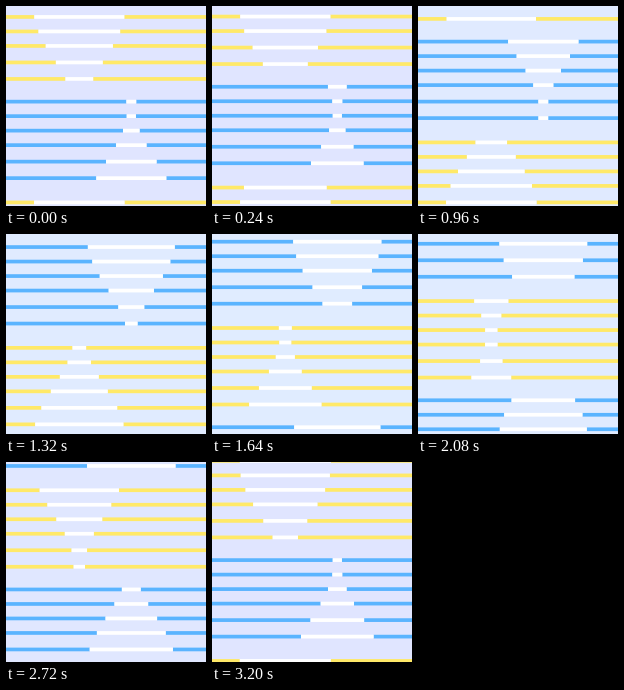
These frames come from a looping animation (200 by 200 pixels, 3240 ms). An HTML page with a canvas:

```html
<!DOCTYPE html>
<html>
<head>
<meta charset="utf-8">
<style>
html, body { margin: 0; width: 100%; height: 100%; overflow: hidden; }
canvas { display: block; width: 100vw; height: 100vh; }
</style>
</head>
<body>
<canvas id="stage" width="200" height="200"></canvas>
<script>
const ctx = document.getElementById('stage').getContext('2d');
const LOOP = 3240, SIZE = 200, THICK = 3.7, TAU = Math.PI * 2;
const ROWS = [0, 14.5, 29, 43.5, 60, 76.5];
const BANDS = [
  { start: 0, color: '#5ab4ff', mid: 125.3, width: 48.5, crest: 4 },
  { start: 100.8, color: '#ffe968', mid: 73.3, width: 51.3, crest: 2.9 }
];
const SWING = 40;

function drawLine(band, y) {
  const w = band.width + SWING * Math.cos(TAU * (y - band.crest) / SIZE);
  const left = band.mid - w / 2, right = band.mid + w / 2, top = y - THICK / 2;
  ctx.fillStyle = band.color;
  ctx.fillRect(0, top, left, THICK);
  ctx.fillRect(right, top, SIZE - right, THICK);
  ctx.fillStyle = '#fff';
  ctx.fillRect(left, top, w, THICK);
}

function draw(now) {
  const p = (now % LOOP) / LOOP;
  const wave = Math.cos(TAU * p);
  ctx.fillStyle = `rgb(224, ${Math.round(232.5 - 3.5 * wave)}, 255)`;
  ctx.fillRect(0, 0, SIZE, SIZE);

  const scroll = 95.1 + 0.6 * wave - SIZE * p;
  for (const band of BANDS) {
    for (const row of ROWS) {
      // Wrap so lines leaving the top come back at the bottom.
      const y = (scroll + band.start + row + THICK + SIZE * 2) % SIZE - THICK;
      drawLine(band, y);
      drawLine(band, y + SIZE);
    }
  }
}

function tick(now) {
  draw(now);
  requestAnimationFrame(tick);
}
draw(0);
requestAnimationFrame(tick);
</script>
</body>
</html>
```
